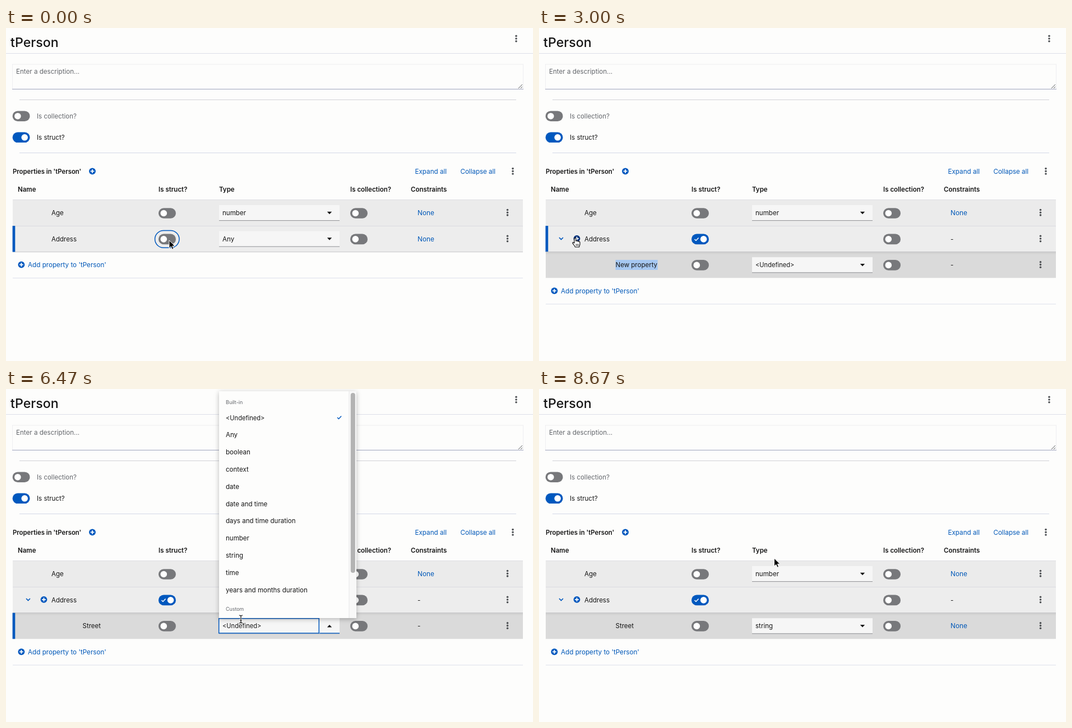
These frames come from a looping animation (940x596 px, 8.74 s). An HTML page:

```html
<!DOCTYPE html>
<html lang="en">
<head>
<meta charset="utf-8">
<title>tPerson</title>
<style>
  html, body { margin: 0; width: 100%; height: 100%; overflow: hidden; background: #fdfdfc; }
  svg { display: block; width: 940px; height: 596px; }
  text { font: 11.6px Inter, "Open Sans", sans-serif; font-optical-sizing: none; fill: #151515; white-space: pre; }
  .title { font-weight: 450; }
  .bold { font-weight: 600; }
  .link { fill: #0058b8; }
  .grey { fill: #63666b; }
</style>
</head>
<body>
<svg id="stage" viewBox="0 0 940 596" xmlns="http://www.w3.org/2000/svg"></svg>
<script>
const LOOP = 8740;
const BLUE = '#0058be', NAVY = '#00317a', GREY = '#77787b';
const ROW = 46.6, FIRST = 331;
const rowY = i => FIRST + i * ROW;

// Times of the events
const T = { struct: 470, add: 2070, type: 3870, focus: 5270, open: 5400, pick: 7200 };
const KEYS = [[3870, 'S'], [4000, 'St'], [4130, 'Str'], [4200, 'Stre'], [4330, 'Stree'], [4530, 'Street']];
const PATH = [
  [0, 291, 380], [930, 291, 380], [1600, 82, 390], [1870, 65, 376], [4800, 65, 376],
  [5270, 418, 424], [6130, 418, 424], [6470, 419, 412], [7000, 421, 303],
  [8070, 421, 303], [8400, 419.5, 303]
];
const CURSORS = [
  [0, 'arrow'], [1800, 'hand'], [3870, ''], [4870, 'arrow'],
  [5200, 'beam'], [6540, 'hand'], [7200, 'arrow']
];
const OPTIONS = ['<Undefined>', 'Any', 'boolean', 'context', 'date', 'date and time',
  'days and time duration', 'number', 'string', 'time', 'years and months duration'];
const OPTION_H = 30.8, optionY = i => 51.3 + i * OPTION_H;

const esc = s => s.replace(/</g, '&lt;').replace(/>/g, '&gt;');
const text = (x, y, s, cls = '', size = 11.6, id = '') =>
  `<text x="${x}" y="${y}" class="${cls}" style="font-size:${size}px" id="${id}">${esc(s)}</text>`;
const rect = (x, y, w, h, fill, more = '') =>
  `<rect x="${x}" y="${y}" width="${w}" height="${h}" fill="${fill}" ${more}/>`;
const group = (id, body, more = '') => `<g id="${id}" ${more}>${body}</g>`;
const path = (d, more) => `<path d="${d}" ${more}/>`;
const kebab = (x, y) => [-4.7, 0, 4.7].map(d => `<circle cx="${x}" cy="${y + d}" r="1.8" fill="#4f5255"/>`).join('');
const plus = (x, y, id = '') =>
  `<circle cx="${x}" cy="${y}" r="5.9" fill="${BLUE}" id="${id}"/>` +
  path(`M${x - 3.4} ${y}h6.8M${x} ${y - 3.4}v6.8`, 'stroke="#fff" stroke-width="1.8"');
const tick = (x, y, color) =>
  path(`M${x - 3.5} ${y}l2.5 2.5 4.6-5`, `fill="none" stroke="${color}" stroke-width="1.5"`);
const toggle = (x, y, on, id = '') =>
  rect(x, y - 9.3, 31, 18.6, on ? BLUE : GREY, `rx="9.3" id="${id}Track"`) +
  `<circle cx="${x + (on ? 21.6 : 9.3)}" cy="${y}" r="5.8" fill="#fff" id="${id}Knob"/>`;
const caret = (y, up) => path(up ? `M572.8 ${y + 2.2}h8.4l-4.2-4.5z` : `M572.8 ${y - 2.3}h8.4l-4.2 4.5z`, 'fill="#151515"');
const select = (y, value, id = '') =>
  rect(380, y - 14, 215, 27.5, '#f6f6f6') + rect(380, y + 13.1, 215, 1, '#8f9194') +
  text(386, y + 4.2, value, '', value[0] === '<' ? 11.1 : 11.6, id) + caret(y);
const none = (y, id = '') => text(734, y + 4.2, 'None', 'link', 11.8, id);
const dash = (y, id = '') => text(734, y + 4.2, '-', '', 11.6, id);
const row = (i, fill) => rect(12, rowY(i) - 23.5, 910, ROW, fill);
const bar = (i, id) => rect(11.6, rowY(i) - 23.5, 4.7, ROW, BLUE, `id="${id}"`);

const header =
  text(8, 34, 'tPerson', 'title', 23.2) + kebab(910, 19) + rect(0, 45, 940, 1, '#dcdfe9') +
  rect(11.5, 65, 911, 44, '#fdfdfc', 'stroke="#eeeef2"') + rect(11, 109, 912, 1, '#a4a9c0') +
  text(18, 81.5, 'Enter a description...', 'grey', 11.6) +
  path('M914 108l7-7M918 108l3-3', 'stroke="#55585c" stroke-width="1"') +
  rect(24, 128, 886, 1, '#d0d1d7') +
  toggle(11.6, 157.7, false) + text(55, 162, 'Is collection?', 'grey', 11.5) +
  toggle(11.6, 195.8, true) + text(55, 200, 'Is struct?', '', 11.5) +
  rect(24, 223, 886, 1, '#d3d8e8') +
  text(12, 261, "Properties in 'tPerson'", 'bold', 11.35) + plus(154, 256.3) +
  text(729.5, 260.6, 'Expand all', 'link', 11.65) + text(810.5, 260.6, 'Collapse all', 'link', 11.55) +
  kebab(904, 256.3) +
  [[21, 'Name'], [272, 'Is struct?'], [380, 'Type'], [614, 'Is collection?'], [722, 'Constraints']]
    .map(([x, s]) => text(x, 293.2, s, 'bold', 11.5)).join('');

const y0 = rowY(0), y1 = rowY(1), y2 = rowY(2);
const ageRow = row(0, '#ebebeb') + rect(12, 307, 910, 1, '#dedee2') +
  text(81, y0 + 4.2, 'Age') + toggle(272, y0 + .5, false) + select(y0, 'number') +
  toggle(614, y0 + .5, false) + none(y0) + kebab(894.5, y0 - .8);

const addressRow = row(1, '#ededed') + rect(12, 354, 910, 1, '#dadae0') + rect(12, 400.3, 910, 1, '#c4c4c6') +
  bar(1, 'addressBar') + text(81, y1 + 4.2, 'Address', '', 11.5) +
  group('plain', select(y1, 'Any') + none(y1)) +
  group('nested', path('M36 375l3.5 3.5 3.5-3.5', `fill="none" stroke="${BLUE}" stroke-width="1.7"`) +
    plus(67.5, 376.8, 'addChild') + dash(y1)) +
  toggle(272, y1 + .3, false, 'struct') + group('structTick', tick(281, 378, '#fff')) +
  rect(265.6, 362.4, 43.4, 30.8, 'none', `rx="15.4" stroke="${BLUE}" stroke-width="1.5" id="ring"`) +
  toggle(614, y1 + .3, false) + kebab(894.5, y1 - .6);

const streetRow = group('streetRow', row(2, '#dadada') + rect(12, 400.5, 910, 1.2, '#bfbfc1') +
  rect(12, 401.7, 910, 3, '#d3d3d3') + bar(2, 'streetBar') +
  rect(136.5, 415, 75.2, 18, '#a6c8f2', 'id="mark"') +
  text(136.5, y2 + 4.2, 'New property', '', 11.5, 'childName') + rect(0, 416, 1.1, 16, '#151515', 'id="textCaret"') +
  toggle(272, y2 + .2, false) +
  group('undefinedType', select(y2, '<Undefined>') + dash(y2)) +
  group('stringType', select(y2, 'string') + none(y2)) +
  toggle(614, y2 + .2, false) + kebab(894.5, y2 - .6));

const footer = group('footer', plus(27.4, 423.7) +
  text(39, 428.2, "Add property to 'tPerson'", 'link', 11.68) + rect(12, 447, 910, 1, '#dde0ec'));

const menu = group('menu',
  rect(380, y2 - 14, 215, 27.5, '#f6f6f6') +
  rect(379.7, 410.7, 178.6, 26.3, '#f6f6f6', `stroke="${BLUE}" stroke-width="1.5"`) +
  rect(559.5, 436.4, 35.5, 1.4, BLUE) + text(386, y2 + 4.2, '<Undefined>', '', 11.1) + caret(y2, true) +
  rect(380, 4, 245, 406, '#fdfdfc', 'style="filter:drop-shadow(0 2px 4px #0004)"') +
  rect(380, 0, 231.5, OPTION_H, '#f0f0f0', 'id="hover"') +
  text(392, 26.5, 'Built-in', 'grey', 9.1) +
  OPTIONS.map((s, i) => text(392, optionY(i) + 4.3, s, '', i ? 11.55 : 11.1)).join('') +
  tick(594.5, 51, BLUE) + text(392, 397.2, 'Custom', 'grey', 8.9) +
  rect(611.5, 4, 13.5, 406, '#f8f8f8') + rect(611.5, 4, 1, 406, '#e7e7e7') +
  rect(614.8, 7, 8, 322, '#b3b3b3', 'rx="4"'));

const cursors = group('cursor',
  group('arrow', path('M0 0V14.2L3.3 11.1 5.6 16.2 8 15.2 5.8 10.2H10.3Z',
    'fill="#000" stroke="#fff" stroke-width="1" stroke-linejoin="round"')) +
  group('hand', path('M-2 8V1.2C-2-.6 .9-.6 .9 1.2V5.4C1.2 4.3 3.3 4.4 3.4 5.8 3.9 4.9 5.8 5.1 5.9 6.6 6.5 5.9 8 6.3 8 7.8V11C8 12.6 6.8 13.4 6.7 16H-.6C-.8 14-4.5 10.6-5 9-5.4 7.4-3.5 7-2 9Z',
    'fill="#fff" stroke="#000" stroke-width="1.1" stroke-linejoin="round"') +
    path('M1.2 10.5v3.5M3.2 10.5v3.5M5.2 10.5v3.5', 'stroke="#000" stroke-width=".8"')) +
  group('beam', ['#fff', '#111'].map((c, i) =>
    path('M-3.2-7Q0-7 0-5Q0-7 3.2-7M0-5V5M-3.2 7Q0 7 0 5Q0 7 3.2 7M-1.5 2.5H1.5',
      `fill="none" stroke="${c}" stroke-width="${i ? 1.2 : 2.6}"`)).join('')));

document.getElementById('stage').innerHTML = header + ageRow + addressRow + streetRow + footer + menu + cursors;

const el = id => document.getElementById(id);
const show = (id, on) => { el(id).style.display = on ? '' : 'none'; };
const at = (table, t) => table.filter(k => k[0] <= t).pop();

function pointer(t) {
  const i = PATH.findIndex(k => k[0] > t);
  if (i < 0) return PATH[PATH.length - 1].slice(1);
  const [ta, xa, ya] = PATH[i - 1], [tb, xb, yb] = PATH[i];
  const p = (t - ta) / (tb - ta), e = p * p * (3 - 2 * p);
  return [xa + (xb - xa) * e, ya + (yb - ya) * e];
}

function draw(t) {
  const [x, y] = pointer(t), kind = at(CURSORS, t)[1];
  el('cursor').setAttribute('transform', `translate(${x} ${y})`);
  ['arrow', 'hand', 'beam'].forEach(id => show(id, id === kind));

  const on = t >= T.struct, slide = Math.min(1, Math.max(0, (t - T.struct) / 200));
  el('structTrack').setAttribute('fill', on ? BLUE : GREY);
  el('structKnob').setAttribute('cx', 281.3 + 12.3 * slide);
  show('structTick', on);
  show('plain', !on);
  show('nested', on);
  show('ring', t < T.add);
  el('addChild').setAttribute('fill', t > 1800 && t < 4930 ? NAVY : BLUE);

  const added = t >= T.add, typing = t >= T.type && t < T.focus;
  show('streetRow', added);
  el('footer').setAttribute('transform', `translate(0 ${added ? ROW : 0})`);
  const typed = at(KEYS, t), name = el('childName');
  name.textContent = typed ? typed[1] : 'New property';
  show('mark', !typed);
  show('textCaret', typing);
  if (typing) el('textCaret').setAttribute('x', 136.7 + name.getComputedTextLength());

  const picked = t >= T.pick, open = t >= T.open && !picked;
  show('addressBar', t < T.focus);
  show('streetBar', t >= T.focus && !picked);
  show('undefinedType', !picked);
  show('stringType', picked);
  show('menu', open);
  const item = Math.floor((y - optionY(0)) / OPTION_H + .5);
  show('hover', open && item >= 0 && item < OPTIONS.length);
  el('hover').setAttribute('y', optionY(item) - OPTION_H / 2);
}

const start = performance.now();
function frame() {
  draw((performance.now() - start) % LOOP);
  requestAnimationFrame(frame);
}
frame();
</script>
</body>
</html>
```
